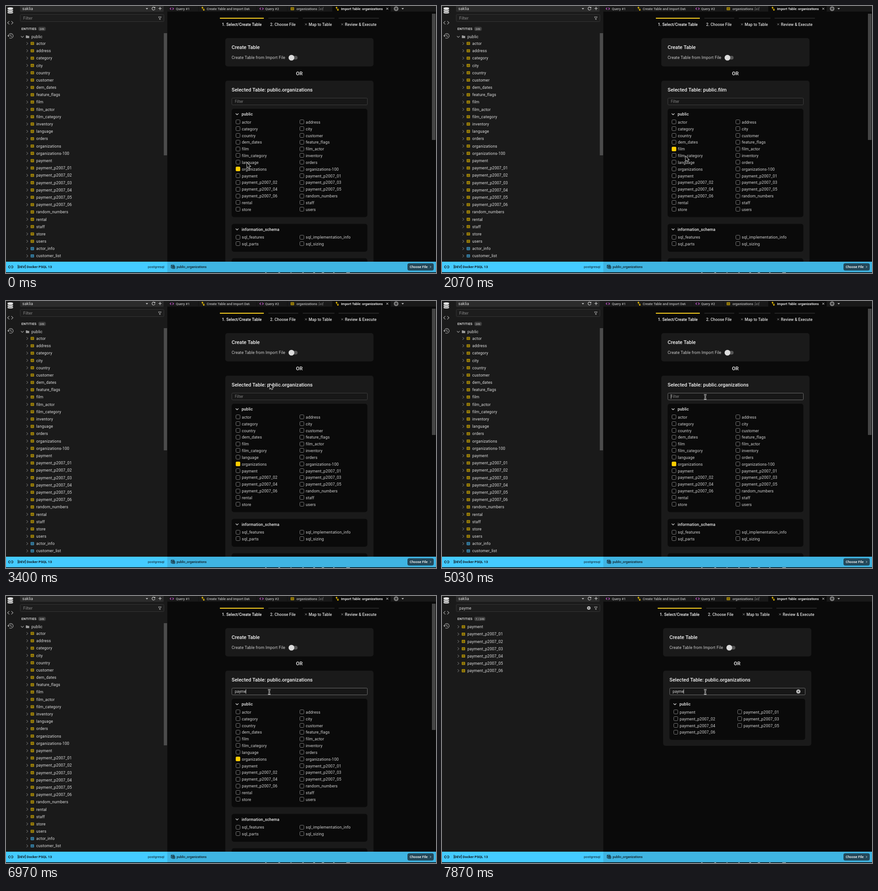
These frames come from a looping animation (949 by 590 pixels, 8 s). An HTML page with a canvas:

```html
<!DOCTYPE html>
<html lang="en">
<head>
<meta charset="utf-8">
<title>Import table</title>
<style>
html, body { margin: 0; width: 100%; height: 100%; overflow: hidden; background: #0a0a0a; }
canvas { display: block; }
</style>
</head>
<body>
<canvas id="stage" width="949" height="590"></canvas>
<script>
const ctx = document.getElementById('stage').getContext('2d');
const LOOP = 8000;
const BG = '#0a0a0a', PANEL = '#1a1a1a', YELLOW = '#ffcc00', GOLD = '#d4ac00', PINK = '#d05ad8', BLUE = '#40a8dc';

const tables = `actor address category city country customer dem_dates feature_flags film film_actor
film_category inventory language orders organizations organizations-100 payment payment_p2007_01
payment_p2007_02 payment_p2007_03 payment_p2007_04 payment_p2007_05 payment_p2007_06
random_numbers rental staff store users`.split(/\s+/);
const views = ['actor_info', 'customer_list'];
const schemaTables = ['sql_features', 'sql_implementation_info', 'sql_parts', 'sql_sizing'];

// Pointer stops: [time, x, y]
const pointer = [
  [0, 532, 346.5], [140, 533, 341], [290, 534, 335], [440, 532, 329], [580, 530, 324], [730, 528, 321],
  [880, 527, 319], [2070, 537.5, 332], [2220, 538.5, 350], [2360, 526, 363], [2510, 511, 359],
  [2960, 518, 330], [3100, 545, 270], [3250, 572, 215], [3400, 582.5, 183.5], [3540, 581, 212]
];
const typing = [[0, ''], [5770, 'p'], [5920, 'pa'], [6220, 'pay'], [6670, 'paym'], [6970, 'payme']];
const caretStates = [[0, 0], [3990, 1], [4430, 0], [5030, 1], [5480, 0], [5770, 1], [7570, 0], [7870, 1]];
const at = (steps, t) => steps.findLast(s => s[0] <= t);

function text(str, x, y, { size = 8.75, weight = 400, color = '#dedede', spacing = 0.16, style = 'normal' } = {}) {
  ctx.font = `${style} ${weight} ${size}px Roboto, sans-serif`;
  ctx.letterSpacing = spacing + 'px';
  ctx.fillStyle = color;
  ctx.fillText(str, x, y + size * 0.36);
  return ctx.measureText(str).width;
}

function clippedText(str, x, y, right, options) {
  ctx.save();
  ctx.beginPath();
  ctx.rect(x, 0, right - x, 13);
  ctx.clip();
  text(str, x, y, options);
  ctx.restore();
}

function rect(x, y, w, h, fill, radius = 0, stroke) {
  ctx.beginPath();
  ctx.roundRect(x, y, w, h, radius);
  if (fill) { ctx.fillStyle = fill; ctx.fill(); }
  if (stroke) { ctx.strokeStyle = stroke; ctx.lineWidth = 1; ctx.stroke(); }
}

function path(d, x, y, { stroke, fill, width = 1.1 } = {}) {
  const p = new Path2D(d);
  ctx.save();
  ctx.translate(x, y);
  if (stroke) { ctx.strokeStyle = stroke; ctx.lineWidth = width; ctx.stroke(p); }
  if (fill) { ctx.fillStyle = fill; ctx.fill(p); }
  ctx.restore();
}

function disc(x, y, r, fill) {
  ctx.beginPath();
  ctx.arc(x, y, r, 0, 7);
  ctx.fillStyle = fill;
  ctx.fill();
}

const chevronRight = (x, y) => path('M-1.5-3 1.5 0-1.5 3', x, y, { stroke: '#929292', width: 1 });
const chevronDown = (x, y, color = '#929292') => path('M-3-1.5 0 1.5 3-1.5', x, y, { stroke: color, width: 1.2 });
const cross = (x, y, r, color) => path(`M${-r} ${-r} ${r} ${r}M${r} ${-r} ${-r} ${r}`, x, y, { stroke: color, width: 1 });
const plus = (x, y, r, color) => path(`M${-r} 0H${r}M0 ${-r}V${r}`, x, y, { stroke: color, width: 1.2 });
const code = (x, y, s, color) =>
  path(`M${-s * .35} ${-s * .6}L${-s} 0 ${-s * .35} ${s * .6}M${s * .35} ${-s * .6}L${s} 0 ${s * .35} ${s * .6}`, x, y, { stroke: color, width: 1.2 });
const arrows = (x, y) =>
  path('M-1.5 1V-3.5M-3.2-2-1.5-3.7 .2-2M1.5-1V3.5M-.2 2 1.5 3.7 3.2 2', x, y, { stroke: YELLOW });
const dropdown = (x, y) => path('M-2.7-1.3H2.7L0 1.6Z', x, y, { fill: '#cfcfcf' });

function tableIcon(x, y, color) {
  rect(x - 3.6, y - 3.3, 7.2, 6.6, color, 0.8);
  path('M-3-1.2H3M-3 1.2H3M-1.2-2.7V2.7M1.2-2.7V2.7', x, y, { stroke: '#1a1a1ac0', width: 0.8 });
}

function clearButton(x, y, r) {
  disc(x, y, r, '#c8c8c8');
  cross(x, y, r * 0.42, PANEL);
}

function sidebar(query) {
  rect(0, 0, 356, 565, PANEL);
  for (let i = 0; i < 3; i++) {
    path('M-6-1C-6-3 6-3 6-1V1C6 3-6 3-6 1Z', 9.5, 5.5 + i * 4.2, { fill: '#e0e0e0' });
    if (i) path('M-6-1.6C-6 .4 6 .4 6-1.6', 9.5, 5.3 + i * 4.2, { stroke: PANEL, width: 0.9 });
  }
  code(9.5, 37, 6, '#a0a0a0');
  path('M-4.5 1A5.2 5.2 0 1 1-2.5 4.2M-6.5-1-4.5 1.4-2.2-1M.5-3V.5L3 2', 10, 66, { stroke: '#a0a0a0', width: 1.2 });

  rect(31, -4, 317, 17, '#2b2b2b', 2);
  text('saklia', 36, 6);
  dropdown(311, 6);
  path('M2.7-1.8A3.3 3.3 0 1 0 3.3 .8M3.3-3.6V-1.2H.9', 325.5, 5.5, { stroke: '#cfcfcf' });
  plus(340, 5.5, 3.5, '#cfcfcf');

  rect(31.5, 18.5, 317, 16, '#1d1d1d', 2, '#343434');
  text(query || 'Filter', 38, 26.7, { color: query ? '#d4d4d4' : '#8c8c8c' });
  if (query) clearButton(324, 26.5, 3.8);
  path('M-3.2-3H3.2L.8 .3V3.2L-.8 2.5V.3Z', 339.5, 27, { stroke: '#b8b8b8', width: 0.9 });

  text('ENTITIES', 34, 50.3, { size: 7.5, weight: 500, spacing: 0.24, color: '#f0f0f0' });
  rect(71, 46, query ? 25 : 17, 9, '#3c3c3c', 4);
  text(query ? '7 / 249' : '249', 74, 50.5, { size: 6.2, spacing: 0 });

  const indent = query ? 0 : 10.8;
  const top = query ? 68 : 82.8;
  if (!query) {
    chevronDown(36, 68);
    path('M-3.7-3H-.8L.3-1.9H3.7V3H-3.7Z', 47.5, 68, { fill: '#9a9a9a' });
    text('public', 56, 68);
    rect(348.3, 60, 7.2, 270, '#4c4c4c');
  }
  const names = query ? tables.filter(n => n.includes(query)) : [...tables, ...views];
  names.forEach((name, i) => {
    const y = top + i * 16.19;
    chevronRight(36 + indent, y);
    tableIcon(47.3 + indent, y, views.includes(name) ? BLUE : GOLD);
    text(name, 56 + indent, y);
  });
}

function tabBar() {
  const tab = { size: 7.5, weight: 500, spacing: 0, color: '#b4b4b4' };
  rect(356, 0, 593, 12.5, '#191919');
  rect(720, 0, 129, 12.5, BG);
  for (const x of [424.5, 552.5, 620.5]) rect(x, 0, 1, 12, '#101010');
  code(366, 6, 4, PINK);
  text('Query #1', 375, 6, tab);
  arrows(435, 6);
  clippedText('Create Table and Import Data', 443, 6, 538, tab);
  code(564, 6, 4, PINK);
  text('Query #2', 572, 6, tab);
  tableIcon(632, 6, GOLD);
  text('organizations', 641, 6, tab);
  text('[all]', 690, 6, { ...tab, size: 7, weight: 400, style: 'italic', color: '#808080' });
  arrows(731, 6);
  clippedText('Import Table: organizations', 739.5, 6, 834, { ...tab, color: '#ffffff' });
  cross(841.5, 6, 2.2, '#e0e0e0');
  disc(861, 6, 5.2, '#7c7c7c');
  plus(861, 6, 2.8, '#101010');
  dropdown(875.5, 6);
}

function checkbox(x, y, amount) {
  rect(x + 0.5, y - 4.5, 9, 9, null, 2, '#7c7c7c');
  if (amount) {
    ctx.globalAlpha = amount;
    rect(x, y - 5, 10, 10, YELLOW, 2.5);
    ctx.globalAlpha = 1;
  }
}

function checkList(title, names, top, height, checked = {}) {
  rect(498, top, 299.5, height, BG, 5);
  chevronDown(510, top + 12, '#e0e0e0');
  text(title, 520, top + 12, { weight: 500, color: '#f0f0f0' });
  names.forEach((name, i) => {
    const x = 507 + (i % 2) * 141;
    const y = top + 29.65 + (i >> 1) * 14.85;
    checkbox(x, Math.floor(y), checked[name]);
    text(name, x + 13.5, y, { color: '#d2d2d2' });
  });
}

function stepper() {
  const label = { size: 8.7, weight: 500, spacing: 0.08, color: '#e0e0e0' };
  [[472, 97], [579, 66], [655, 70], [734, 89]].forEach(([x, w], i) => rect(x, 26, w, 2, i ? '#242424' : '#ffd420'));
  text('1. Select/Create Table', 476.5, 41, { ...label, color: '#ffffff' });
  text('2. Choose File', 583, 41, label);
  cross(662, 40.5, 2, '#909090');
  text('Map to Table', 668, 41, label);
  cross(742, 40.5, 2, '#909090');
  text('Review & Execute', 748, 41, label);
}

function importForm(t, query) {
  const heading = { size: 11.05, weight: 500, spacing: 0, color: '#f4f4f4' };
  const filtered = query !== '';
  ctx.save();
  ctx.beginPath();
  ctx.rect(356, 12, 593, 553);
  ctx.clip();
  if (filtered) ctx.translate(4, 0);
  else rect(940, 17, 8, 279, '#454545');
  stepper();

  rect(484, 71, 327, 62.5, PANEL, 5);
  text('Create Table', 498, 91, heading);
  text('Create Table from Import File', 498, 114.3, { color: '#cfcfcf' });
  rect(626, 110.3, 17.5, 8, '#555555', 4);
  disc(630, 114.3, 6.3, '#dcdcdc');
  text('OR', 640, 149, heading);

  const filmPicked = t >= 1170 && t < 2810;
  const fade = t < 1320 ? 0.5 : t >= 2810 && t < 2960 ? 0.6 : 1;
  const checked = filmPicked ? { film: fade, organizations: 1 - fade }
    : { organizations: t < 1170 ? 1 : fade, film: t < 1170 ? 0 : 1 - fade };

  rect(484, 165, 327, filtered ? 166 : 420, PANEL, 5);
  text('Selected Table: public.' + (filmPicked ? 'film' : 'organizations'), 498, 185, heading);

  const border = t < 3990 ? '#3e3e3e' : t < 4140 ? '#555555' : '#6c6c6c';
  rect(498.5, 203.5, 299, 15, '#171717', 2, border);
  const typed = at(typing, t)[1];
  const width = text(typed || 'Filter', 505, 211, { size: 8.25, spacing: 0.04, color: typed ? '#d4d4d4' : '#808080' });
  if (at(caretStates, t)[1]) rect(505 + Math.floor(typed ? width : 0), 206, 1, 10, '#b8b8b8');
  if (filtered) clearButton(782.5, 211, 4.6);

  if (filtered) {
    checkList('public', tables.filter(n => n.includes(query)), 227, 91);
  } else {
    checkList('public', tables, 227, 239.5, checked);
    checkList('information_schema', schemaTables, 481.4, 61.5);
    rect(498, 557.5, 299.5, 40, BG, 5);
  }
  ctx.restore();
}

function footer() {
  const dark = { size: 7.6, color: '#101c22', spacing: 0 };
  rect(0, 588, 949, 2, '#050505');
  rect(0, 565, 356, 23.5, '#44cbff');
  rect(356, 565, 593, 23.5, '#3fb4e2');
  for (const [x, w] of [[572, 3], [601, 4], [628, 2], [654, 3], [678, 4], [697, 5], [722, 3], [751, 8]]) rect(x, 588.8, w, 1.2, '#b0b0b0');
  path('M-1-2.5H-2.5A2.5 2.5 0 0 0-2.5 2.5H-1M1-2.5H2.5A2.5 2.5 0 0 1 2.5 2.5H1M-2 0H2', 10.5, 576.5, { stroke: '#101c22', width: 1.2 });
  text('[DEV] Docker PSQL 13', 25.5, 576.3, { ...dark, weight: 700 });
  text('postgresql', 313, 576, { ...dark, spacing: 0.08 });
  path('M-4-3.5H2.5V-1M-4-3.5V3H-2M-4-1.3H2M-1.5-.8H4.2V4H-1.5ZM-1.5 1.4H4.2M1.3-.8V4', 368.5, 576, { stroke: '#101c22', width: 1 });
  text('public_organizations', 376.5, 576, { ...dark, size: 7.15, weight: 500 });
  rect(886, 568.5, 58, 16, '#24485a', 4);
  text('Choose File', 891, 576.3, { size: 7.55, weight: 500, spacing: 0, color: '#ffffff' });
  path('M-1-1.8 .8 0-1 1.8', 937, 576.5, { stroke: '#ffffff', width: 0.9 });
}

function drawPointer(t) {
  const [, x, y] = at(pointer, t);
  if (t < 3540) {
    path('M0 0V10.4L2.4 8.3 4 12 5.7 11.3 4.1 7.7H7.3Z', x, y, { stroke: '#f4f4f4', width: 1.6, fill: '#000000' });
  } else {
    const beam = 'M-2.8-5Q0-5 0-3.4Q0-5 2.8-5M0-3.6V3.6M-2.8 5Q0 5 0 3.4Q0 5 2.8 5';
    path(beam, x, y, { stroke: '#f4f4f4', width: 2.6 });
    path(beam, x, y, { stroke: '#000000', width: 1 });
  }
}

function draw(now) {
  const t = now % LOOP;
  const query = t >= 7570 ? 'payme' : '';
  rect(0, 0, 949, 590, BG);
  sidebar(query);
  importForm(t, query);
  tabBar();
  footer();
  drawPointer(t);
  requestAnimationFrame(draw);
}
requestAnimationFrame(draw);
</script>
</body>
</html>
```
